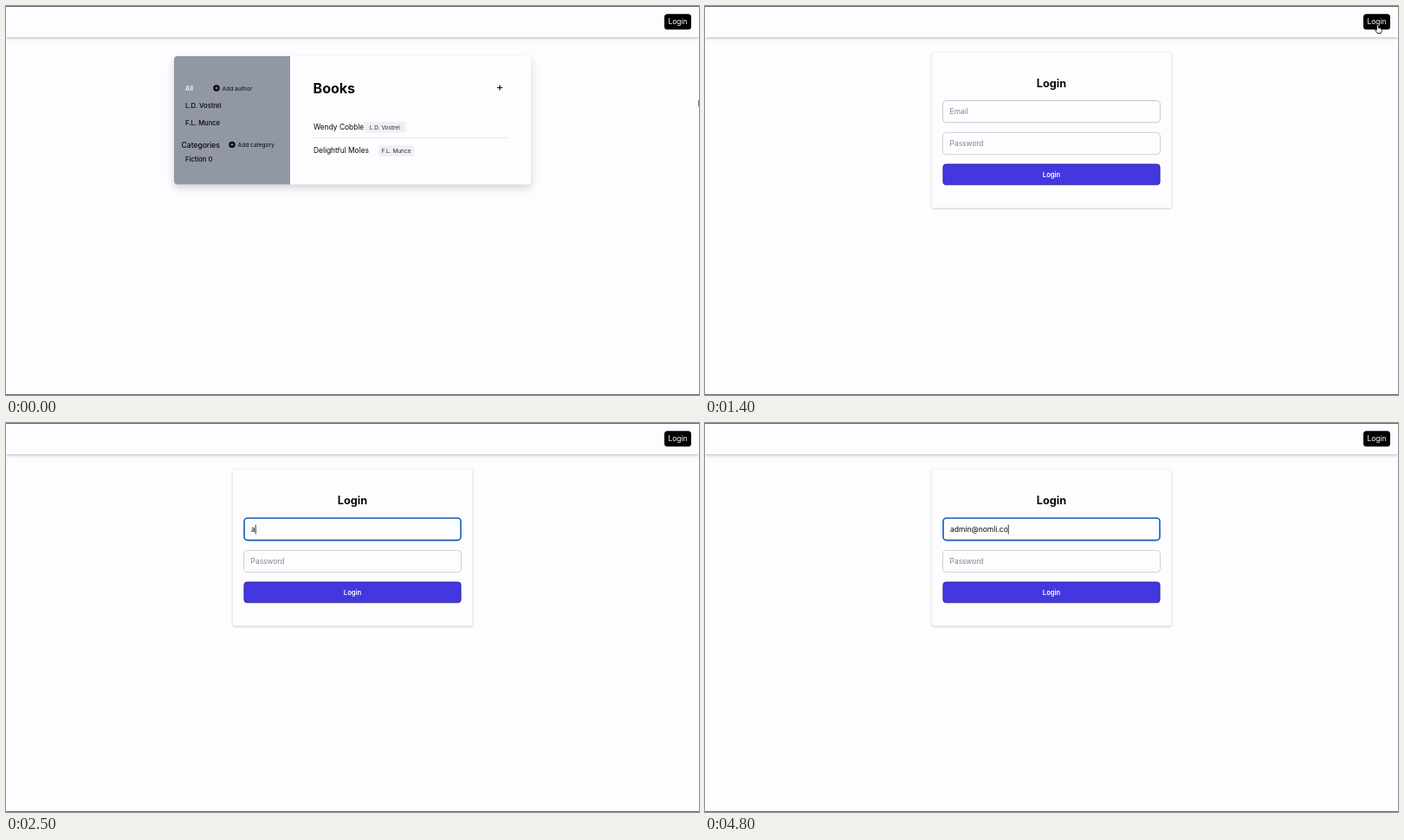
An HTML page with a canvas for the animation above (5000 ms loop, 800x450 px).

```html
<!DOCTYPE html>
<html lang="en">
<head>
<meta charset="utf-8">
<title>Book list login</title>
<style>
  html, body { margin: 0; width: 100%; height: 100%; overflow: hidden; background: #fdfdff; }
  canvas { display: block; width: 800px; height: 450px; }
</style>
</head>
<body>
<canvas id="stage"></canvas>
<script>
const W = 800, H = 450, LOOP = 5000, STEP = 100;
const FONT = 'Inter, "Liberation Sans", sans-serif';
const canvas = document.getElementById('stage');
const ctx = canvas.getContext('2d');
const dpr = window.devicePixelRatio || 1;
canvas.width = W * dpr;
canvas.height = H * dpr;

const SHOW_LOGIN = 1400, FOCUS = 2000, TYPE = 2500;
const TYPED = 'admin@nomli.co';
// Time at which each character appears
const KEYS = [2500, 2600, 2800, 2900, 3100, 3500, 3800, 4000, 4200, 4300, 4500, 4700, 4700, 4800];

// Pointer stops: time, x, y, kind
const STOPS = [
  [0, 799, 108, 'arrow'],
  [100, 690, 84, 'arrow'],
  [200, 540, 79, 'arrow'],
  [300, 400, 98, 'arrow'],
  [400, 285, 132, 'arrow'],
  [500, 211, 169, 'hand'],
  [600, 233, 138, 'hand'],
  [700, 212, 169, 'hand'],
  [900, 330, 135, 'arrow'],
  [1000, 620, 78, 'arrow'],
  [1100, 792, 30, 'arrow'],
  [1200, 780, 22, 'hand'],
  [1400, 776.5, 21.5, 'hand'],
  [1500, 745, 38, 'arrow'],
  [1600, 650, 76, 'arrow'],
  [1700, 530, 108, 'arrow'],
  [1800, 444, 125, 'beam'],
  [1900, 418, 127, 'beam'],
  [2100, 420, 125, 'beam'],
  [2200, 423, 120, 'beam'],
  [2300, 425, 114, 'beam'],
  [2400, 426, 93, 'arrow'],
  [TYPE, 0, 0, 'none']
];

// y is the middle of the capital letters
function text(str, x, y, size, color = '#0b0b0d', weight = 400, align = 'left') {
  ctx.font = `${weight} ${size}px ${FONT}`;
  ctx.textAlign = align;
  ctx.fillStyle = color;
  ctx.fillText(str, x, y + size * 0.364);
  return ctx.measureText(str).width;
}

function shadow(color, blur, dy) {
  ctx.shadowColor = color;
  ctx.shadowBlur = blur * dpr;
  ctx.shadowOffsetY = dy * dpr;
}

function box(x, y, w, h, r, fill, stroke, line = 1) {
  ctx.beginPath();
  ctx.roundRect(x, y, w, h, r);
  if (fill) { ctx.fillStyle = fill; ctx.fill(); }
  if (stroke) { ctx.strokeStyle = stroke; ctx.lineWidth = line; ctx.stroke(); }
}

function shadowBox(x, y, w, h, r, fill, color, blur, dy) {
  ctx.save();
  shadow(color, blur, dy);
  box(x, y, w, h, r, fill);
  ctx.restore();
}

function disc(x, y, r, color) {
  ctx.beginPath();
  ctx.arc(x, y, r, 0, Math.PI * 2);
  ctx.fillStyle = color;
  ctx.fill();
}

function plus(x, y, r, color, line) {
  ctx.beginPath();
  ctx.moveTo(x - r, y); ctx.lineTo(x + r, y);
  ctx.moveTo(x, y - r); ctx.lineTo(x, y + r);
  ctx.strokeStyle = color;
  ctx.lineWidth = line;
  ctx.stroke();
}

function header() {
  ctx.fillStyle = '#fdfdff';
  ctx.fillRect(0, 0, W, H);
  shadowBox(0, 0, W, 36, 0, '#fdfdff', 'rgba(0,0,0,.28)', 4, 1);
  ctx.fillStyle = '#68686b';
  ctx.fillRect(0, 0, W, 1);
  ctx.fillRect(0, 449, W, 1);
  box(760, 9.3, 31, 17.9, 3.5, '#000');
  text('Login', 775.5, 18.4, 8.5, '#fff', 400, 'center');
}

function addLink(label, x, y) {
  disc(x, y, 3.7, '#08080a');
  plus(x, y, 1.8, '#9297a5', 0.9);
  text(label, x + 6.6, y + 0.2, 6.6, '#0b0b0d');
}

function bookRow(title, author, y, tagX, tagW) {
  text(title, 355, y, 8.4, '#08080a');
  box(tagX, y - 5.6, tagW, 12.6, 2.2, '#eff0f4');
  text(author, tagX + tagW / 2, y + 0.7, 6.5, '#252b38', 400, 'center');
}

function booksPage() {
  shadowBox(194, 58, 412, 148.6, 4, '#fdfdff', 'rgba(0,0,0,.17)', 10, 4);
  box(194, 58, 134, 148.6, [4, 0, 0, 4], '#9297a5');

  text('All', 207, 95, 7.6, '#fff', 500);
  addLink('Add author', 243, 95);
  text('L.D. Vostrel', 207, 115, 7.6, '#08080a', 500);
  text('F.L. Munce', 207, 135, 7.6, '#08080a', 500);
  text('Categories', 202.6, 160.6, 8.5, '#08080a', 500);
  addLink('Add category', 261, 160.4);
  text('Fiction 0', 207, 177.2, 7.6, '#08080a', 500);

  text('Books', 354.6, 95, 16, '#08080a', 700);
  plus(570, 94.5, 3.1, '#08080a', 1.2);
  bookRow('Wendy Cobble', 'L.D. Vostrel', 139.6, 413, 48.5);
  ctx.fillStyle = '#e6e7ec';
  ctx.fillRect(355, 152, 224, 1);
  bookRow('Delightful Moles', 'F.L. Munce', 167, 430, 41);
}

function envelope(x, y) {
  box(x - 3.4, y - 2.7, 6.8, 5.4, 0.6, null, '#dcdcdc', 0.8);
  ctx.beginPath();
  ctx.moveTo(x - 3.2, y - 2.2);
  ctx.lineTo(x, y + 0.3);
  ctx.lineTo(x + 3.2, y - 2.2);
  ctx.stroke();
}

function suggestions() {
  ctx.beginPath();
  ctx.moveTo(335.5, 141.5);
  ctx.lineTo(340.7, 136.4);
  ctx.lineTo(346, 141.5);
  ctx.fillStyle = '#1c1c1d';
  ctx.fill();
  shadowBox(329.5, 141, 131, 69.5, 4, '#1c1c1d', 'rgba(0,0,0,.25)', 3, 1);
  envelope(341.5, 153.3);
  text('Tommarelhosby@nomli.com', 353.8, 153.5, 7.2, '#f1f1f1');
  envelope(341.5, 173.3);
  text('Veku@nomli.com', 353.8, 173.5, 7.2, '#f1f1f1');
  ctx.fillStyle = '#505052';
  ctx.fillRect(329.5, 185.5, 131, 0.8);
  disc(341.5, 198.3, 3.7, '#dcdcdc');
  text('Manage Addresses…', 353.8, 198.5, 7, '#bfbfc1');
}

function emailField(t) {
  const focused = t >= FOCUS;
  if (focused) box(275, 110, 250, 25.6, 3.8, '#fdfdff', '#1259bd', 1.6);
  else box(274.5, 109.5, 251, 25.2, 4, '#fdfdff', '#c6c8cd');

  const typed = TYPED.slice(0, KEYS.filter(k => k <= t).length);
  let end = 283;
  if (typed) end += text(typed, 283, 123, 8.5, '#0b0b0d');
  else text('Email', 282.6, focused ? 123 : 122.4, 8.4, '#7d818b');

  const blink = t >= 3300 && t < 3500;
  if (focused && !blink) {
    ctx.fillStyle = '#111';
    ctx.fillRect(end, 117.6, 0.8, 11);
  }
}

function loginPage(t) {
  const dy = t >= FOCUS ? 1 : 0;
  shadowBox(261.5, 53.5, 277, 180.3 + dy, 3, '#fdfdff', 'rgba(0,0,0,.24)', 2.5, 0.6);
  text('Login', 400, 89.8, 12.7, '#08080a', 700, 'center');
  emailField(t);
  box(274.5, 146.4 + dy, 251, 25.2, 4, '#fdfdff', '#cfd1d6');
  text('Password', 282.6, 159.2 + dy, 8.4, '#7d818b');
  box(274.9, 183 + dy, 250.2, 23.8, 3.4, '#4338e0', '#2a2199', 0.9);
  text('Login', 400, 195.2 + dy, 7.6, '#fff', 600, 'center');
  if (t >= FOCUS && t < TYPE) suggestions();
}

function outline(points, fill, stroke) {
  ctx.beginPath();
  points.forEach(([x, y]) => ctx.lineTo(x, y));
  ctx.closePath();
  ctx.fillStyle = fill;
  ctx.strokeStyle = stroke;
  ctx.lineWidth = 0.9;
  ctx.lineJoin = 'round';
  ctx.fill();
  ctx.stroke();
}

const cursors = {
  none() {},
  arrow() {
    outline([[0, 0], [0, 9], [2.1, 7.1], [3.6, 10.4], [5, 9.8], [3.6, 6.6], [6.4, 6.4]], '#000', '#fff');
  },
  hand() {
    outline([[-1, 1], [0, 0.6], [0.8, 1.3], [1, 4], [2.3, 4], [3.5, 4.5], [4.6, 5.1],
      [4.8, 7], [3.9, 10], [-0.5, 10], [-1.8, 8], [-3, 6.2], [-2.4, 5.4], [-1, 6.4]], '#fff', '#111');
  },
  beam() {
    ctx.beginPath();
    ctx.moveTo(-2, -4.5); ctx.quadraticCurveTo(0, -4.5, 0, -3);
    ctx.quadraticCurveTo(0, -4.5, 2, -4.5);
    ctx.moveTo(0, -3); ctx.lineTo(0, 3);
    ctx.moveTo(-2, 4.5); ctx.quadraticCurveTo(0, 4.5, 0, 3);
    ctx.quadraticCurveTo(0, 4.5, 2, 4.5);
    ctx.moveTo(-1.1, 1.4); ctx.lineTo(1.1, 1.4);
    ctx.strokeStyle = '#111';
    ctx.lineWidth = 0.9;
    ctx.stroke();
  }
};

function pointer(t) {
  const [, x, y, kind] = STOPS.filter(s => s[0] <= t).pop();
  ctx.save();
  ctx.translate(x, y);
  cursors[kind]();
  ctx.restore();
}

const start = performance.now();
function frame() {
  const elapsed = Math.max(0, performance.now() - start) % LOOP;
  const t = Math.floor(elapsed / STEP) * STEP;
  ctx.setTransform(dpr, 0, 0, dpr, 0, 0);
  header();
  if (t < SHOW_LOGIN) booksPage();
  else loginPage(t);
  pointer(t);
  requestAnimationFrame(frame);
}
frame();
</script>
</body>
</html>
```
